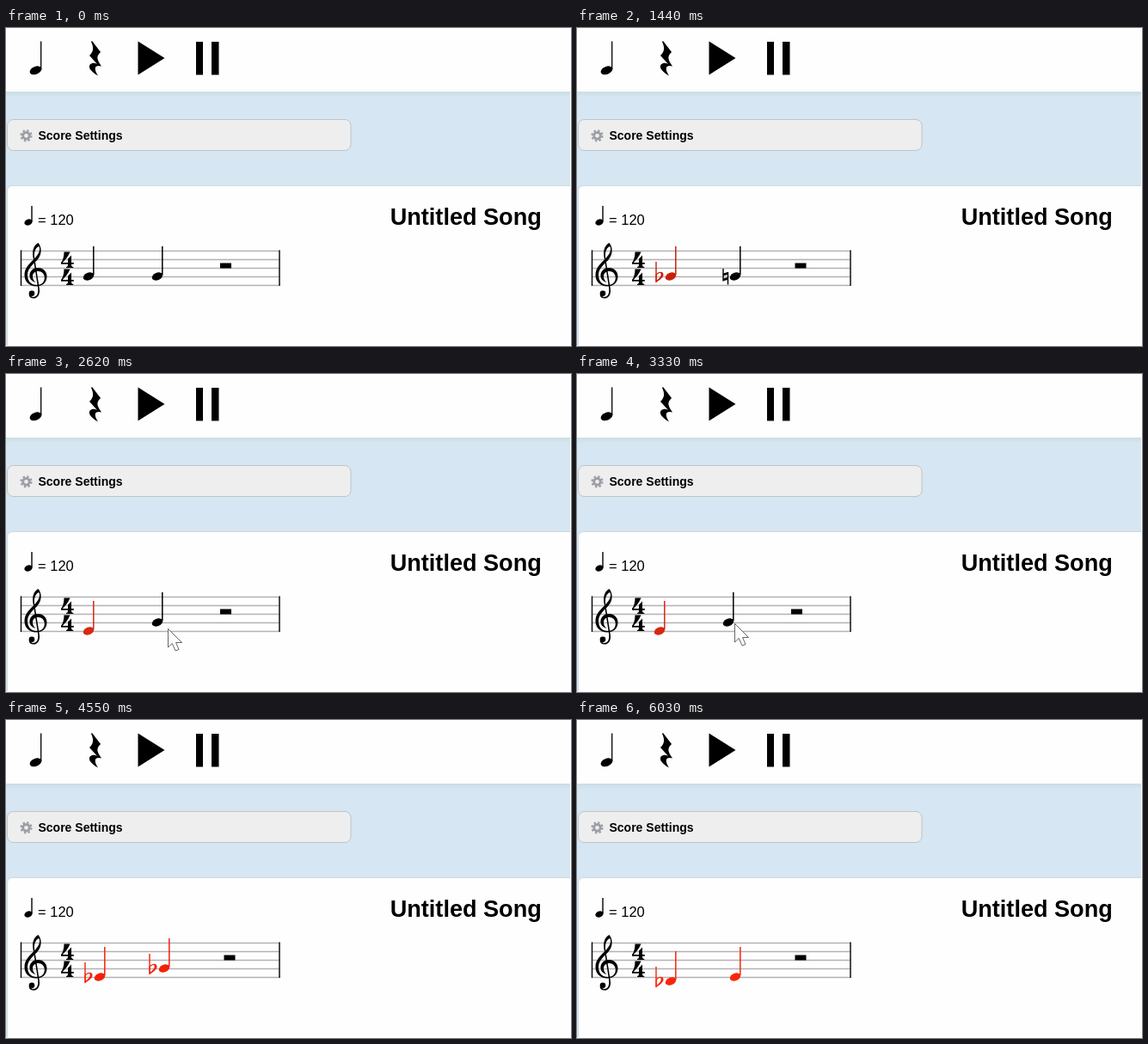
Animation, 657 px wide and 370 px high, one loop 6130 ms. Source, as an HTML page:

```html
<!DOCTYPE html>
<html lang="en">
<head>
<meta charset="utf-8">
<title>Score editor</title>
<style>
html, body { margin: 0; width: 100%; height: 100%; overflow: hidden; background: #fff; }
svg { display: block; width: 657px; height: 370px; }
text { font-family: "Liberation Sans", Arial, sans-serif; fill: #000; }
.bold { font-weight: bold; }
.line { fill: none; stroke: currentColor; }
.ink { fill: currentColor; }
</style>
</head>
<body>
<svg viewBox="0 0 657 370" color="#000">
  <defs>
    <linearGradient id="shade" x1="0" y1="0" x2="0" y2="1">
      <stop offset="0" stop-color="#cbdde3"/>
      <stop offset="1" stop-color="#d6e6f2"/>
    </linearGradient>
    <path id="four" d="M4 .5H11C9 6 5 10 2.3 13H8.5V8.5L12.5 4.5V13H15.3V14.8H12.5C12.5 17 13 18 14.8 18V19H6.5V18C8 18 8.5 17 8.5 14.8H.5V13C3 10 4 5 4 .5Z"/>
    <g id="note">
      <ellipse class="ink" rx="6.5" ry="4.3" transform="rotate(-22)"/>
      <path class="line" stroke-width="1.5" d="M5.8-2V-35"/>
    </g>
    <g id="flat">
      <path class="line" stroke-width="1.4" d="M-17-17V6.5"/>
      <path class="ink" fill-rule="evenodd" d="M-17.5 7.5V-2C-14-6.5-8.5-6-8.5-2C-8.5 1.500-13 4-17.500 7.500ZM-16.300 4.500C-13 2-11.300 0-11.300-2.300C-11.300-5-14.500-4-16.300-1.500Z"/>
    </g>
    <g id="natural">
      <path class="line" stroke-width="1.4" d="M-14-9V5.500M-8.500-5V9.500"/>
      <path class="line" stroke-width="2.800" d="M-14-2L-8.500-3.600M-14 4L-8.500 2.400"/>
    </g>
  </defs>

  <rect width="657" height="370" fill="#fefefe"/>
  <rect y="74" width="656" height="295" fill="#d6e6f2"/>
  <rect y="74" width="656" height="6" fill="url(#shade)"/>

  <g>
    <ellipse cx="34.500" cy="49.300" rx="7.200" ry="4.500" transform="rotate(-22 34.500 49.300)"/>
    <path class="line" stroke-width="1.300" d="M40.700 48V15.500"/>
    <path d="M100 15L110 28C105 33 105 36 111 44.500C104 42.500 101 46 107 55.500C97 50 94.500 44 99 41.500C101 40.300 104 41 106 42L97 32C101.500 28 102.500 23 99 16Z"/>
    <path d="M153.500 15.500L184.500 35L153.500 54.500Z"/>
    <path d="M221 16h8v38.500h-8zM239 16h8.500v38.500h-8.500z"/>
  </g>

  <rect x="1.500" y="106.500" width="399.500" height="36" rx="7" fill="#eee" stroke="#bfc3c5"/>
  <g fill="none" stroke="#9b9ea4">
    <circle cx="23.500" cy="125.300" r="3.800" stroke-width="2.800"/>
    <circle cx="23.500" cy="125.300" r="6" stroke-width="2.200" stroke-dasharray="2.356 2.356"/>
  </g>
  <text class="bold" x="37.500" y="130" font-size="14">Score Settings</text>

  <path d="M1.500 369V190Q1.500 183.500 8 183.500H656V369Z" fill="#fefefe"/>
  <path d="M1.500 369V190Q1.500 183.500 8 183.500H656" fill="none" stroke="#d0d9de"/>
  <text class="bold" x="446.700" y="229" font-size="27.100">Untitled Song</text>

  <ellipse cx="26" cy="226" rx="4.800" ry="3.500" transform="rotate(-22 26 226)"/>
  <path class="line" stroke-width="1.400" d="M30 225V207"/>
  <text x="37" y="228.500" font-size="16.500">= 120</text>

  <path class="line" style="stroke:#b3b1b3" stroke-width="1.400" d="M17 259.500h301M17 269.500h301M17 279.500h301M17 289.500h301M17 299.500h301"/>
  <path class="line" stroke-width="1.400" d="M17.500 258.500v41.500M318 258.500v41.500"/>
  <path d="M34.500 296C29.500 295 27 291 27.500 287C28 282.500 32 279 37 279C43.500 279 47.500 283.500 47.500 289C47.500 296 42.500 300.500 35 300.500C27 300.500 21.500 295 21.500 287.500C21.500 279 27 274.500 32 269.500C36.500 265 39.500 261 39 256C38.800 254 37.500 254 36.500 255C34 257 32.500 261 33 266L31.500 266.500C30 259 32.500 252.500 37.500 250C41 254 42.500 262 37 269C33 274 25 279 25 287.500C25 294.500 29.500 299 35.500 299C41.500 299 44.800 295.500 44.800 290.500C44.800 286 41.500 283 37.500 283C33.500 283 31 285.500 31 289C31 292 32.500 294.500 34.500 296Z"/>
  <path class="line" stroke-width="1.600" d="M32.200 266L38 303C39 310 36 313.700 32 313.700C29 313.700 27.500 312 27.500 309.500"/>
  <circle cx="30" cy="308.700" r="3.300"/>
  <use href="#four" x="63.500" y="260"/>
  <use href="#four" x="63.500" y="280"/>

  <g id="first"><use href="#note"/><use class="flat" href="#flat"/><use class="natural" href="#natural"/></g>
  <g id="second"><use href="#note"/><use class="flat" href="#flat"/><use class="natural" href="#natural"/></g>
  <rect id="rest" y="273.500" width="13" height="6"/>

  <path id="cursor" d="M.500 .500V22L5.300 17.500L9 26L13 24.500L9.500 16.500H16.500Z" fill="#fff" stroke="#666"/>
</svg>
<script>
const LOOP = 6130;
const $ = id => document.getElementById(id);
const lineY = { G: 289, F: 294, E: 299, D: 304 };

// start, first pitch, second pitch, first colour, second colour ("b" flat, "n" natural)
const score = [
  [0, "G", "G", "#000", "#000"],
  [620, "G", "G", "#d0200a", "#000"],
  [1070, "Gb", "Gn", "#c8200a", "#000"],
  [1850, "F", "G", "#d81e05", "#000"],
  [2320, "E", "G", "#d62812", "#000"],
  [3410, "E", "G", "#e02410", "#e02410"],
  [4370, "Eb", "Gb", "#f52008", "#f52008"],
  [4800, "D", "F", "#f82208", "#f82208"],
  [5170, "Db", "E", "#fa260c", "#fa260c"]
];

// start, x, y; no position means hidden
const pointer = [
  [0], [110, 150, 346], [240, 126, 328], [380, 108, 304], [420, 99, 294],
  [800, 103, 302], [890, 108, 310], [1070],
  [1940, 218, 326], [2030, 213, 320], [2220, 206, 313], [2320, 200, 306],
  [2500, 193, 302], [2600, 188, 296], [2720, 185, 292], [2920, 183, 290],
  [4200, 187, 302], [4370]
];

const at = (table, t) => table.findLast(row => row[0] <= t);

function place(el, x, pitch, color) {
  el.setAttribute("transform", `translate(${x} ${lineY[pitch[0]]})`);
  el.style.color = color;
  el.querySelector(".flat").style.display = pitch[1] === "b" ? "" : "none";
  el.querySelector(".natural").style.display = pitch[1] === "n" ? "" : "none";
}

function draw(t) {
  const [, a, b, colorA, colorB] = at(score, t);
  const wide = a.length > 1;
  place($("first"), wide ? 109 : 96, a, colorA);
  place($("second"), wide ? 184 : 176, b, colorB);
  $("rest").setAttribute("x", wide ? 253.5 : 249);

  const [, x, y] = at(pointer, t);
  $("cursor").style.display = x === undefined ? "none" : "";
  if (x !== undefined) $("cursor").setAttribute("transform", `translate(${x} ${y})`);
}

const start = performance.now();
function tick() {
  draw((performance.now() - start) % LOOP);
  requestAnimationFrame(tick);
}
tick();
</script>
</body>
</html>
```
